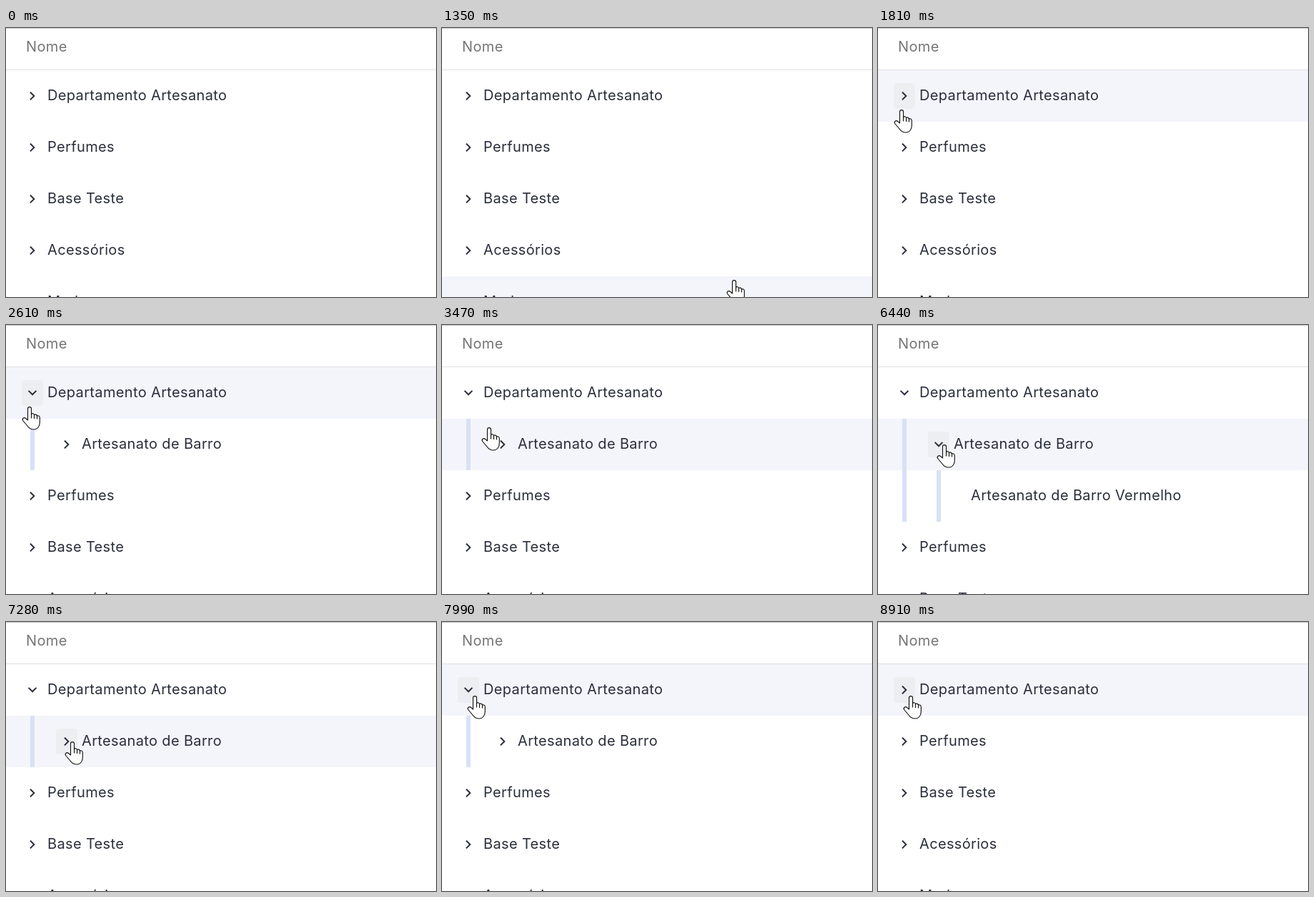
Animation, 602 px wide and 376 px high, one loop 9700 ms. Source, as an HTML page:

```html
<!DOCTYPE html>
<html lang="pt">
<head>
<meta charset="utf-8">
<title>Departamentos</title>
<style>
  html, body { margin: 0; width: 100%; height: 100%; overflow: hidden; background: #fff; }
  svg { display: block; width: 602px; height: 376px; }
  text { font: 400 20px Inter, "Open Sans", sans-serif; letter-spacing: .35px; fill: #2b2f3c; }
  .head { fill: #757575; }
  .hover { fill: #f4f5fb; }
  .button { fill: #eceef1; }
  .guide { fill: #d8e1f5; }
  .chevron { fill: none; stroke: #2b2f3c; stroke-width: 2; stroke-linecap: square; }
  .click { fill: #eded38; fill-opacity: .68; }
  .hand { fill: #fff; stroke: #111; stroke-width: 1.15; stroke-linejoin: round; stroke-linecap: round; }
</style>
</head>
<body>
<svg viewBox="0 0 602 376">
  <rect width="602" height="1" fill="#c4c4c4"/>
  <text class="head" x="28" y="33">Nome</text>
  <g id="list"></g>
  <rect y="58" width="602" height="1" fill="#e0e0e0"/>
  <circle id="click" class="click" r="18"/>
  <g id="hand" class="hand">
    <path d="M-1.5 3C-1.5-.2 3.5-.2 3.5 3V11C4 9 7.5 9.3 7.5 12C8 10.3 11.5 10.8 11.5 13.5C12.5 12 15.3 13 15.3 15.5V22C15.3 28 12 32 7 32C2 32 0 30-2 27L-8 20C-10.5 16.5-6.5 14.5-4.5 16.5L-1.5 19Z"/>
    <path fill="none" d="M3.5 11V16M7.5 12V16.5M11.5 13.5V17"/>
  </g>
</svg>
<script>
const LOOP = 9700, TOP = 59, ROW = 72, INDENT = 48;
const OFFSTAGE = [674, 520];
const $ = id => document.getElementById(id);

const parent = { name: "Departamento Artesanato", children: [] };
const child = { name: "Artesanato de Barro", children: [] };
parent.children.push(child);
child.children.push({ name: "Artesanato de Barro Vermelho" });
const others = ["Perfumes", "Base Teste", "Acessórios", "Moda"];
const tree = [parent, ...others.map(name => ({ name, children: [] }))];

// The pointer advances in discrete steps, slowing towards each stop.
const moves = [
  { start: 1280, end: 1810, steps: 8, power: 4, to: [32, 114] },
  { start: 3160, end: 3930, steps: 11, power: 1.4, to: [90, 165] },
  { start: 6440, end: 6440, steps: 1, power: 1, to: [92, 167] },
  { start: 7590, end: 7990, steps: 6, power: 1.4, to: [45, 103] }
];
const clicks = [
  { item: parent, press: 2370, release: 2460, toggle: 2610 },
  { item: child, press: 4690, release: 4860, toggle: 4940 },
  { item: child, press: 7040, release: 7210, toggle: 7280 },
  { item: parent, press: 8680, release: 8830, toggle: 8910 }
];

function pointerAt(t) {
  const i = moves.filter(m => t >= m.start).length - 1;
  if (i < 0) return null;
  const { start, end, steps, power, to } = moves[i];
  const from = i ? moves[i - 1].to : OFFSTAGE;
  const gap = (end - start) / (steps - 1) || 1;
  const step = Math.min(steps, Math.floor((t - start) / gap + .05) + 1);
  const p = 1 - (1 - step / steps) ** power;
  return from.map((v, axis) => Math.round(v + (to[axis] - v) * p));
}

const isOpen = (item, t) =>
  clicks.filter(c => c.item === item && t >= c.toggle).length % 2 === 1;

function rowsAt(t, items = tree, depth = 0) {
  return items.flatMap(item => {
    const open = isOpen(item, t);
    const row = { name: item.name, leaf: !item.children, depth, open };
    return open ? [row, ...rowsAt(t, item.children, depth + 1)] : [row];
  });
}

const rect = (cls, x, y, w, h, r = 0) =>
  `<rect class="${cls}" x="${x}" y="${y}" width="${w}" height="${h}" rx="${r}"/>`;

function drawRow(row, i, tip) {
  const y = TOP + i * ROW, x = row.depth * INDENT;
  const hover = tip && tip[1] >= y && tip[1] < y + ROW;
  let out = hover ? rect("hover", 0, y, 602, ROW) : "";
  for (let d = 0; d < row.depth; d++) out += rect("guide", 34 + d * INDENT, y, 6, ROW);
  if (!row.leaf) {
    const onButton = hover && tip[0] >= x + 22 && tip[0] < x + 52 &&
      tip[1] >= y + 18 && tip[1] < y + 57;
    if (onButton) out += rect("button", x + 22, y + 18, 30, 36, 4);
    out += `<path class="chevron" d="M-2.4-4.7L2.3 0L-2.4 4.7"
      transform="translate(${x + 37} ${y + 36}) rotate(${row.open ? 90 : 0})"/>`;
  }
  return out + `<text x="${row.leaf ? x + 34 : x + 58}" y="${y + 42}">${row.name}</text>`;
}

function place(el, tip, visible) {
  el.style.display = visible ? "" : "none";
  if (visible) el.setAttribute("transform", `translate(${tip})`);
}

let shown = "";
function frame(t) {
  const tip = pointerAt(t);
  const list = rowsAt(t).map((row, i) => drawRow(row, i, tip)).join("");
  if (list !== shown) $("list").innerHTML = shown = list;
  place($("hand"), tip, tip);
  place($("click"), tip, clicks.some(c => t >= c.press && t < c.release));
}

const start = performance.now();
function tick() {
  frame((performance.now() - start) % LOOP);
  requestAnimationFrame(tick);
}
tick();
</script>
</body>
</html>
```
